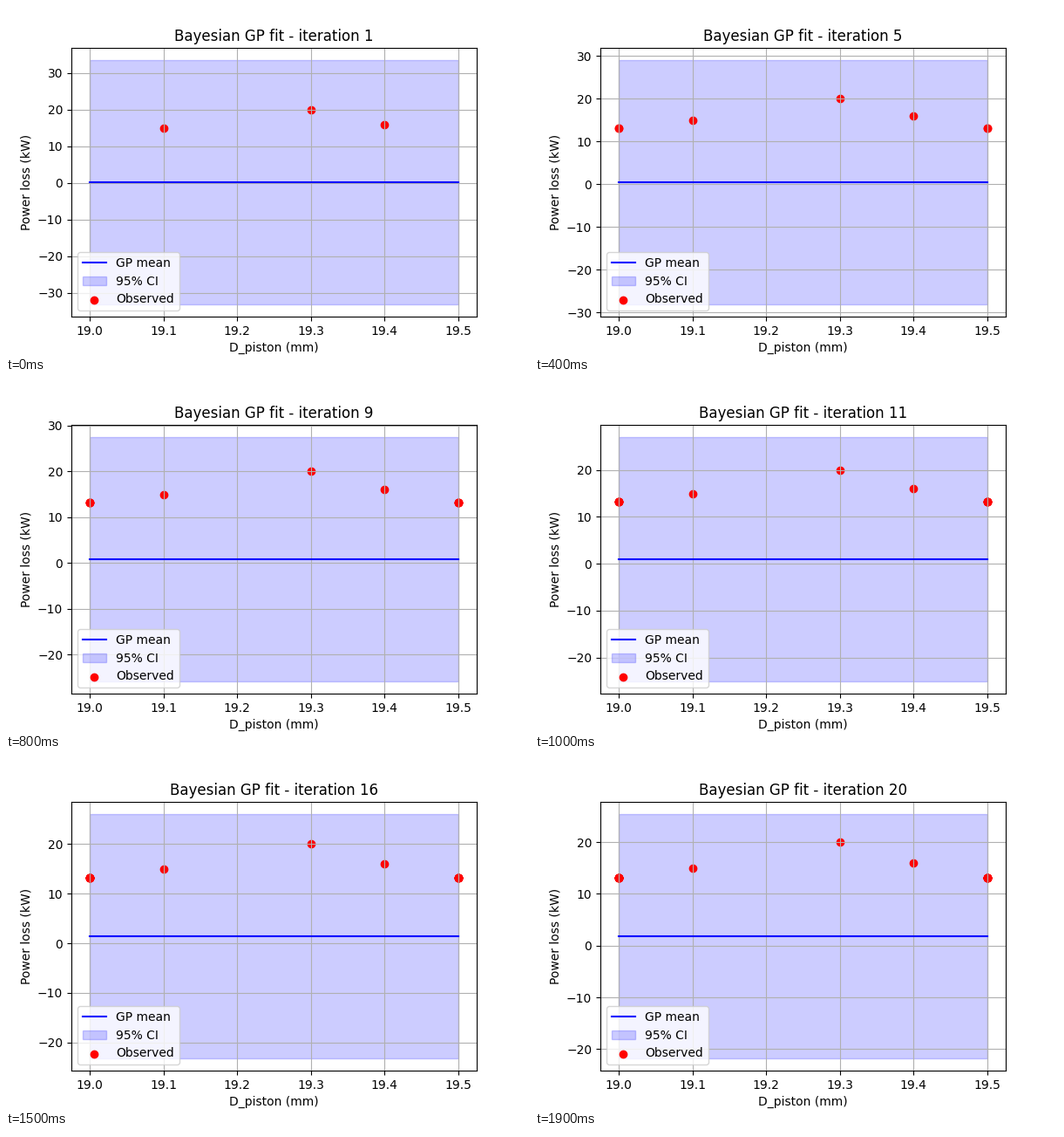
Write a matplotlib script that moves like this. It is 600x400 px and loops after 2 s.

```python
import numpy as np
import matplotlib.pyplot as plt
from matplotlib.animation import FuncAnimation

FRAMES = 20
START_X = [19.1, 19.3, 19.4]
START_Y = [15.0, 20.0, 16.0]
ENDS = [19.0, 19.5]
END_LOSS = 13.15

grid_x = np.linspace(19.0, 19.5, 200)


def observations(iteration):
    """Starting samples plus one sample per iteration, alternating ends."""
    added = iteration - 1
    xs = START_X + [ENDS[k % 2] for k in range(added)]
    ys = START_Y + [END_LOSS] * added
    return np.array(xs), np.array(ys)


def fit_noise(y):
    """Maximum-likelihood noise variance for a unit constant kernel."""
    n = len(y)
    common = y.sum() ** 2 / n
    rest = (y ** 2).sum() - common
    lo, hi = 50.0, 400.0
    for _ in range(50):
        v = (lo + hi) / 2
        slope = (n - 1) / v - rest / v**2 + 1 / (v + n) - common / (v + n) ** 2
        if slope < 0:
            lo = v
        else:
            hi = v
    return (lo + hi) / 2


def posterior(y):
    noise = fit_noise(y)
    total = noise + len(y)
    return y.sum() / total, np.sqrt(noise + noise / total)


fig, ax = plt.subplots(figsize=(6, 4), dpi=100)


def draw(frame):
    iteration = frame + 1
    x, y = observations(iteration)
    mean, std = posterior(y)
    mu = np.full_like(grid_x, mean)

    ax.clear()
    ax.plot(grid_x, mu, color="blue", label="GP mean")
    ax.fill_between(grid_x, mu - 1.96 * std, mu + 1.96 * std,
                    color="blue", alpha=0.2, label="95% CI")
    ax.scatter(x, y, color="red", label="Observed")
    ax.set_title(f"Bayesian GP fit - iteration {iteration}")
    ax.set_xlabel("D_piston (mm)")
    ax.set_ylabel("Power loss (kW)")
    ax.legend(loc="lower left")
    ax.grid(True)
    return []


anim = FuncAnimation(fig, draw, frames=FRAMES, interval=100,
                     init_func=lambda: draw(0), repeat=True, repeat_delay=0)
plt.show()
```
